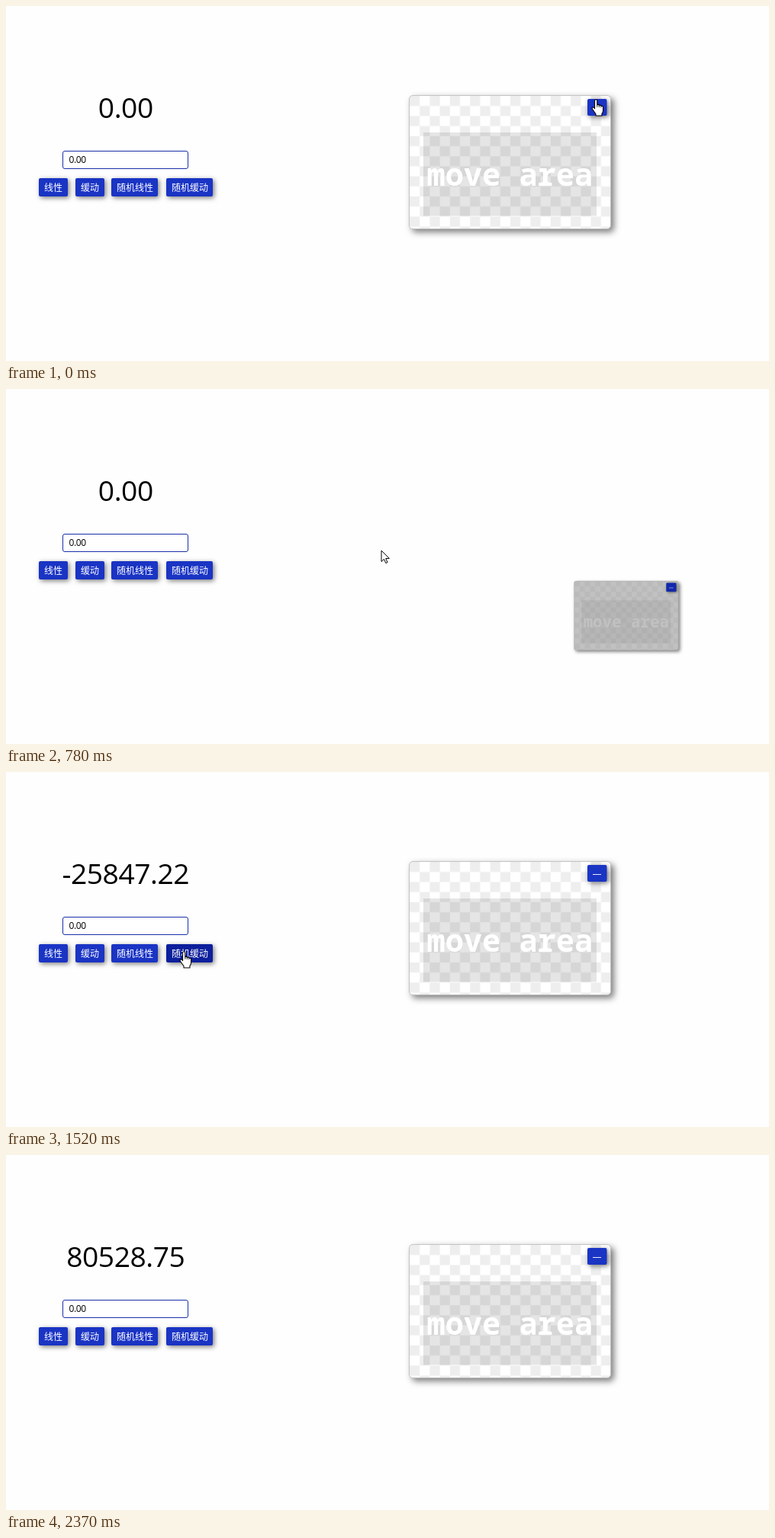
An HTML page that plays this animation: 1000 px wide and 466 px high, repeating every 2450 ms.

```html
<!DOCTYPE html>
<html lang="zh">
<head>
<meta charset="utf-8">
<title>Counter and panel</title>
<style>
  html, body { margin: 0; width: 100%; height: 100%; overflow: hidden; background: #fefefe; }
  svg { display: block; width: 1000px; height: 466px; }
  .btn { fill: #1a34c4; filter: drop-shadow(2px 2px 3px rgba(0, 0, 0, .5)); }
  .btn.on { fill: #0c1f9c; }
  .btn.down { filter: none; }
  .label { font: 500 12px "Noto Sans CJK SC", "Noto Sans CJK", sans-serif; fill: #fff; }
  .num { font: 37.2px "Open Sans", "Noto Sans", sans-serif; letter-spacing: -.45px; text-anchor: middle; }
  .field { font: 12px "Open Sans", "Noto Sans", sans-serif; letter-spacing: -.4px; }
  .area { font: bold 40.3px "Noto Sans Mono", "DejaVu Sans Mono", monospace; fill: #fff; white-space: pre; }
  #panel { filter: drop-shadow(4px 4px 4px rgba(0, 0, 0, .5)); }
</style>
</head>
<body>
<svg viewBox="0 0 1000 466">
  <defs>
    <pattern id="check" patternUnits="userSpaceOnUse" x="529" y="118" width="26.4" height="26.4">
      <rect width="26.4" height="26.4" fill="#fff"/>
      <path d="M0 0h13.2v13.2H0zM13.2 13.2h13.2v13.2h-13.2z" fill="#eee"/>
    </pattern>
    <linearGradient id="glow">
      <stop offset=".45" stop-color="#faa50a" stop-opacity=".76"/>
      <stop offset=".9" stop-color="#faa50a" stop-opacity=".35"/>
    </linearGradient>
  </defs>

  <text class="num" id="num" x="156.8" y="147">0.00</text>
  <rect x="74.5" y="190.5" width="164" height="23" rx="2.5" fill="#fff" stroke="#1a2fa8"/>
  <text class="field" x="82.5" y="206">0.00</text>
  <g id="buttons"></g>

  <g id="panel">
    <rect x="528.5" y="117.5" width="264" height="175" rx="4.5" fill="url(#check)" stroke="#c4c4c4"/>
    <rect x="547" y="166" width="227" height="109.5" fill="#000" fill-opacity=".1"/>
    <text class="area" x="551.5" y="235.5">move area</text>
    <rect id="shade" x="528" y="117" width="265" height="176" rx="5" fill="#999"/>
    <rect class="btn" id="mini" x="762" y="122" width="25.5" height="22" rx="2"/>
    <path d="M769 134.5h11" stroke="#fff" stroke-opacity=".9"/>
  </g>

  <circle id="click" cx="-.5" cy="-.5" r="10.5" fill="url(#glow)"/>
  <g id="arrow" fill="#fff" stroke="#000">
    <path d="M.5.5v14.5l3.4-3.3 2.4 5.3 2.2-1-2.3-5.1h4.6z"/>
  </g>
  <g id="hand">
    <g transform="translate(-.8 -.8) scale(1.06)" fill="#fff" stroke="#000" stroke-linejoin="round">
      <path transform="translate(-5.5)" d="M5.5.5q1.5 0 1.5 1.5v5q2-.6 2.4.6 2-.5 2.4.9 2.2-.4 2.5 1.6v4.4q0 2-1.5 3.6v2.4H5.3v-2Q4 16.5 1 12.3q-.8-1.6.3-2.1 1.2-.3 2.7 1.5V2q0-1.5 1.5-1.5z"/>
      <path d="M1.5 7v3M3.9 7.6v2.6M6.3 8.6v2" stroke-width=".8"/>
    </g>
  </g>
</svg>
<script>
const $ = id => document.getElementById(id);
const LOOP = 2450;
const TICKS = [0, 80, 150, 230, 310, 390, 470, 540, 620, 700, 770, 850, 920, 1000, 1080,
  1160, 1230, 1310, 1380, 1450, 1520, 1750, 1830, 1900, 1980, 2060, 2140, 2220, 2300, 2370];
const BUTTONS = [[43, 38, '线性'], [91, 38, '缓动'], [138, 61, '随机线性'], [210, 61, '随机缓动']];
// pointer tip: time, x, y
const PATH = [[0, 774, 123], [150, 775, 124], [470, 825, 189], [540, 822, 191], [920, 276, 225],
  [1000, 230, 234], [1080, 201, 240], [1160, 197.5, 241], [1230, 198, 241], [1450, 234, 236],
  [1750, 234, 236], [2060, 238.5, 235], [2140, 345, 280], [2220, 617, 386]];
const CLICKS = [80, 1160, 1750];
const LOW = -25847.22, HIGH = 80528.82;
const TAU = 310 / Math.log((HIGH - LOW) / 84.95);

$('buttons').innerHTML = BUTTONS.map(([x, w, s]) =>
  `<rect class="btn" x="${x}" y="226" width="${w}" height="24" rx="2"/>` +
  `<text class="label" x="${x + 7}" y="242.6">${s}</text>`).join('');
const rects = document.querySelectorAll('#buttons rect');

const clamp = v => Math.max(0, Math.min(1, v));
const bez = (a, b, u) => 3 * a * u * (1 - u) ** 2 + 3 * b * u * u * (1 - u) + u ** 3;

// cubic-bezier(.25, .1, .25, 1)
function ease(x) {
  if (x <= 0 || x >= 1) return clamp(x);
  let lo = 0, hi = 1;
  for (let i = 0; i < 24; i++) {
    const mid = (lo + hi) / 2;
    if (bez(.25, .25, mid) < x) lo = mid; else hi = mid;
  }
  return bez(.1, 1, lo);
}

function tipAt(t) {
  let i = 1;
  while (i < PATH.length - 1 && PATH[i][0] < t) i++;
  const [t0, x0, y0] = PATH[i - 1], [t1, x1, y1] = PATH[i];
  const k = clamp((t - t0) / (t1 - t0));
  return [x0 + (x1 - x0) * k, y0 + (y1 - y0) * k];
}

function valueAt(t) {
  if (t < 1750) return LOW * clamp((t - 1160) / 360);
  return HIGH - (HIGH - LOW) * Math.exp((1750 - t) / TAU);
}

const show = (el, on) => el.setAttribute('visibility', on ? 'visible' : 'hidden');

function drawPanel(t) {
  const p = t < 650 ? ease((t - 172) / 500) : 1 - ease((t - 648) / 500);
  const s = 1 - .8 * p;
  const cx = 660.5 + 315 * (1 - s), cy = 205 + 191 * (1 - s);
  $('panel').setAttribute('transform', `translate(${cx} ${cy}) scale(${s}) translate(-660.5 -205)`);
  $('shade').setAttribute('opacity', p);
  $('mini').style.fill = `rgb(${26 - 14 * p}, ${52 - 21 * p}, ${196 - 40 * p})`;
}

function drawPointer(t) {
  const [x, y] = tipAt(t), seen = t < 2300, click = CLICKS.includes(t);
  let hand = t < 200;
  BUTTONS.forEach(([bx, w], i) => {
    const over = seen && x >= bx && x < bx + w && y >= 226 && y < 250;
    rects[i].classList.toggle('on', over);
    rects[i].classList.toggle('down', over && click);
    hand = hand || over;
  });
  for (const id of ['arrow', 'hand', 'click']) $(id).setAttribute('transform', `translate(${x} ${y})`);
  show($('arrow'), seen && !hand);
  show($('hand'), seen && hand);
  show($('click'), click);
}

function draw(ms) {
  const now = ms % LOOP;
  const t = TICKS.filter(v => v <= now).pop();
  $('num').textContent = (valueAt(t) || 0).toFixed(2);
  drawPanel(t);
  drawPointer(t);
}

let start;
function loop(now) {
  if (start === undefined) start = now;
  draw(Math.max(0, now - start));
  requestAnimationFrame(loop);
}
draw(0);
requestAnimationFrame(loop);
</script>
</body>
</html>
```
